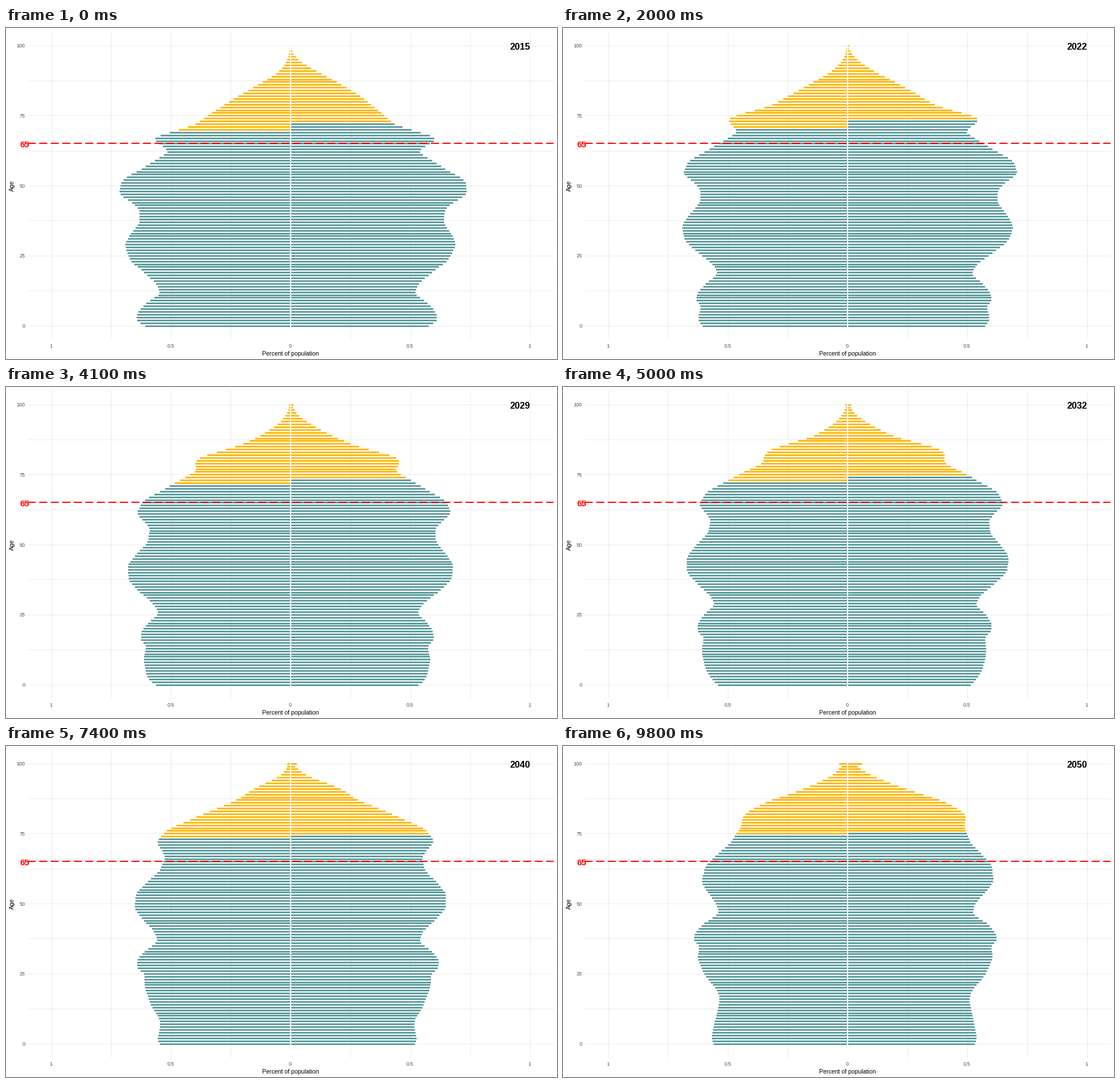
A matplotlib script that plays this animation: 966 by 580 pixels, repeating every 10000 ms.

```python
import matplotlib.pyplot as plt
import numpy as np
from matplotlib.animation import FuncAnimation
from matplotlib.collections import PolyCollection

W, H, DPI = 966, 580, 100
MID, UNIT = 499, 419.5          # x of zero, pixels per 1 percent
BASE, STEP = 521.6, 4.91        # y of age 0, pixels per year of age
TEAL, GOLD, GRID = "#5F9EA0", "#FFB90F", "#EBEBEB"
AGES = np.arange(101)
START = 2015

# Turning points: birth year and size of the birth cohort
COHORTS = np.array([
    (1921, 124), (1930, 146), (1940, 165), (1943, 175), (1945, 198), (1948, 228),
    (1953, 197), (1955, 206), (1959, 228), (1964, 254), (1967, 255), (1972, 231),
    (1974, 225), (1977, 225), (1983, 244), (1987, 255), (1991, 255), (1995, 243),
    (2001, 221), (2003, 219), (2007, 242), (2011, 259), (2013, 261), (2015, 254),
    (2020, 260), (2025, 257), (2033, 241), (2038, 248), (2050, 266)], float)

# Size of the right side relative to the left, by birth year
RATIO = np.array([(1922, 1.6), (1930, 1.17), (1937, 1.05), (1945, 1.01),
                  (1966, 1.01), (1987, 0.985), (2000, 0.957)])

plt.rcParams["font.family"] = "Liberation Sans"


def px(n):
    return n * 72 / DPI


def smooth(x, points):
    """Monotone cubic curve through the points."""
    xp, yp = points.T
    x = np.clip(x, xp[0], xp[-1])
    h = np.diff(xp)
    d = np.diff(yp) / h
    p, s = d[:-1] * d[1:], d[:-1] + d[1:]
    inner = np.where(p > 0, 2 * p / np.where(s == 0, 1, s), 0)
    m = np.concatenate([d[:1], inner, d[-1:]])
    i = np.clip(np.searchsorted(xp, x, "right") - 1, 0, len(h) - 1)
    t = (x - xp[i]) / h[i]
    return (yp[i] * (1 + 2 * t) * (1 - t) ** 2 + yp[i + 1] * t * t * (3 - 2 * t)
            + h[i] * t * (1 - t) * (m[i] * (1 - t) - m[i + 1] * t))


def logistic(center, width):
    return 1 / (1 + np.exp((center - AGES) / width))


# Gains and losses by migration over a lifetime
MIGRATION = (1 + 0.035 * (1 - np.exp(-AGES / 1.5))
             + 0.15 * logistic(25, 5) - 0.065 * logistic(60, 4))


def lengths(year, right):
    """Bar lengths in pixels: cohort size x migration x survival / population."""
    born, passed = year - AGES, year - START
    hazard = 0.484 * np.exp(0.13 * (AGES - 0.14 * passed - 80))
    n = smooth(born, COHORTS) * MIGRATION * np.exp(-hazard) / (1 + 0.004 * passed)
    if right:
        n = (n * smooth(born, RATIO) * np.exp(0.26 * hazard ** 0.75)
             * (1 + 0.02 * logistic(22, 5)))
    n[100] *= 2                 # open age group
    return np.round(n)


def old_age(year, right):
    passed = year - START
    return int(73.4 + 0.1 * passed if right else 70.93 + 0.14 * passed)


def boxes(x0, x1, y0, y1):
    return np.stack([np.stack(c, -1) for c in ((x0, y0), (x1, y0), (x1, y1), (x0, y1))], 1)


fig = plt.figure(figsize=(W / DPI, H / DPI), dpi=DPI, facecolor="white")
ax = fig.add_axes([0, 0, 1, 1])
ax.set(xlim=(0, W), ylim=(H, 0))
ax.axis("off")


def label(x, y, text, size, color="black", **kw):
    return ax.text(x, y, text, fontsize=px(size), color=color, zorder=6, **kw)


def rule(x, y, color, width, **kw):
    ax.plot(x, y, color=color, lw=px(width), solid_capstyle="butt", **kw)


# Panel grid and axes
for k in range(9):
    x = MID + (k / 4 - 1) * UNIT
    y = BASE - 12.5 * k * STEP
    rule([x, x], [5, 546], GRID, 1, zorder=1)
    rule([38, 960], [y, y], GRID, 1, zorder=1)
    if k % 2 == 0:
        label(x - 0.4, 559.5, f"{abs(k / 4 - 1):g}", 9, "#4D4D4D", ha="center")
        label(33.3, y + 3.4, f"{12.5 * k:g}", 9, "#4D4D4D", ha="right")
label(498.6, 573.5, "Percent of population", 10.5, ha="center")
label(11, 276, "Age", 10.8, rotation=90, ha="center", va="center")

bars = ax.add_collection(PolyCollection([], lw=0, antialiased=False, zorder=3))
rule([MID, MID], [5, 546], "white", 2, zorder=4)

rule([38, 960], [202, 202], "red", 2, zorder=5, dashes=(7.1, 3), dash_capstyle="butt")
label(33, 209, "65", 15, "red", weight="bold", ha="center")
year_text = label(901.5, 38, "", 16, weight="bold", ha="center")


def year_at(i):
    """A year lasts three ticks, the last few years two."""
    return START + (i + 1) // 3 if i <= 86 else 2044 + (i - 86) // 2


def show(i):
    year = year_at(i)
    top = np.round(BASE - AGES * STEP) - 1
    center = np.full(len(AGES), 498.0)
    shapes, colors = [], []
    for right in (False, True):
        n = lengths(year, right)
        ends = center + n if right else center - n
        shapes.append(boxes(center, ends, top, top + 3))
        colors += [GOLD if a >= old_age(year, right) else TEAL for a in AGES]
    bars.set_verts(np.concatenate(shapes))
    bars.set_facecolor(colors)
    year_text.set_text(str(year))
    return bars, year_text


anim = FuncAnimation(fig, show, frames=100, interval=100, repeat=True,
                     repeat_delay=0, init_func=lambda: show(0))
plt.show()
```
